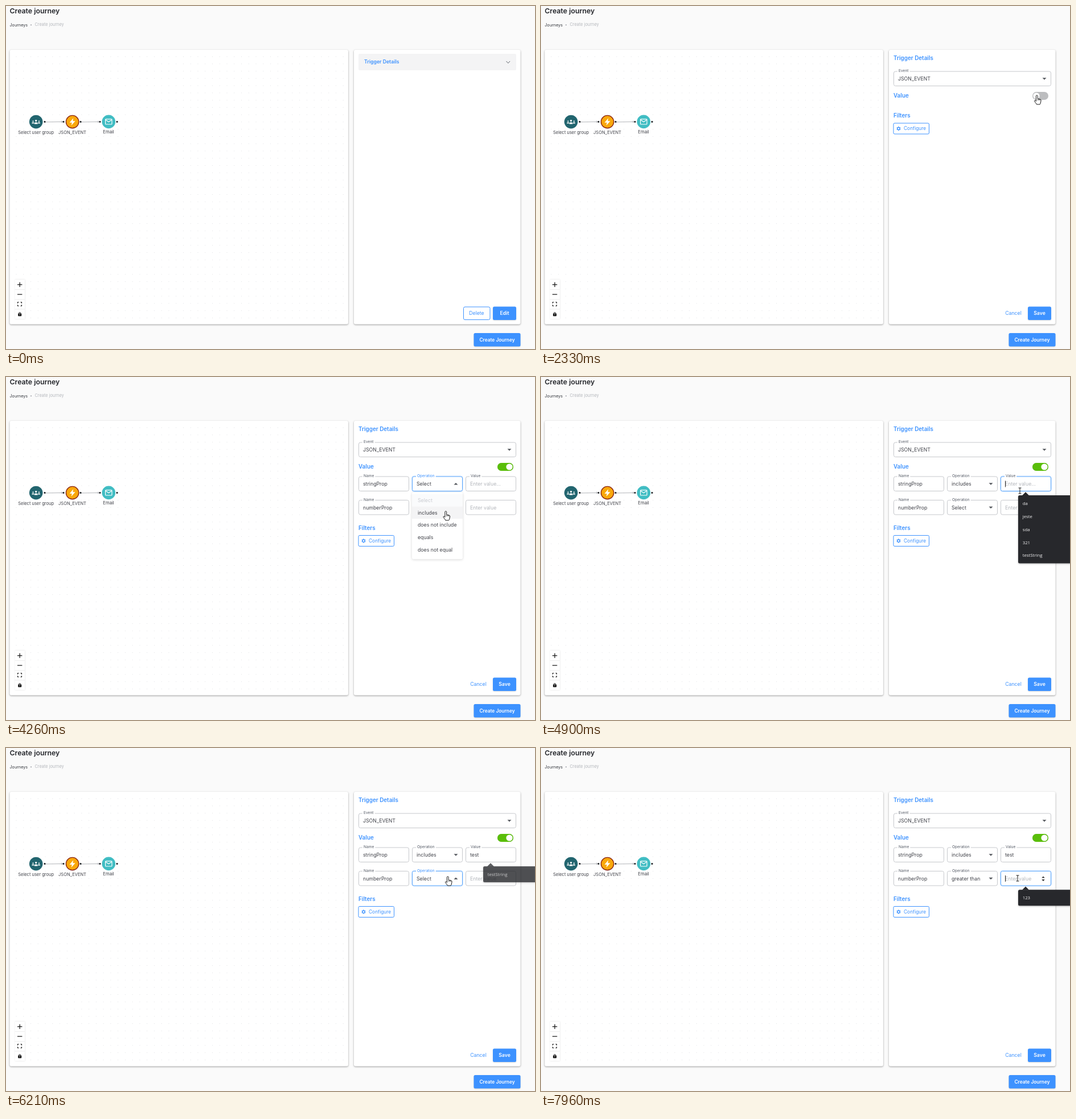
These frames come from a looping animation (929 by 603 pixels, 7.99 s). An HTML page with a canvas:

```html
<!DOCTYPE html>
<html lang="en">
<head>
<meta charset="utf-8">
<title>Create journey</title>
<style>
html, body { margin: 0; width: 100%; height: 100%; overflow: hidden; background: #fafafa; }
canvas { display: block; width: 929px; height: 603px; }
</style>
</head>
<body>
<canvas id="stage" width="929" height="603"></canvas>
<script>
const ctx = document.getElementById('stage').getContext('2d');
const LOOP = 7990;
const BLUE = '#3d92ff', INK = '#404249', BORDER = '#c6c8cc', HINT = '#b3b6bb', LABEL = '#555b66';

// Moments at which the interface changes, in ms
const T = {
  enter: 340, edit: 1150, toggle: 2680, open1: 3370, pick1: 4275, focus1: 4770, list1: 4850,
  type: [5080, 5290, 5480, 5680], open2: 6190, menu2: 6230, pick2: 7340, focus2: 7870
};

// Pointer tip: time, x, y, shape
const PATH = [
  [340, 852, 601, 'hand'], [560, 862, 580, 'hand'], [650, 868, 563, 'arrow'],
  [720, 873, 549, 'hand'], [810, 876, 541, 'hand'], [1320, 876, 541, 'hand'],
  [1380, 874, 520, 'arrow'], [1650, 851, 310, 'arrow'], [1930, 829, 168, 'arrow'],
  [1970, 830, 168, 'arrow'], [2200, 863, 160, 'hand'], [2330, 871, 157, 'hand'],
  [2720, 871, 157, 'hand'], [2830, 838, 171, 'arrow'], [3000, 790, 184, 'hand'],
  [3170, 771, 186, 'hand'], [3450, 771, 186, 'hand'], [3750, 773, 225, 'hand'],
  [4000, 772.5, 236, 'hand'], [4330, 772.5, 236, 'hand'], [4450, 790, 222, 'arrow'],
  [4560, 822, 196, 'beam'], [4700, 840, 192, 'beam'], [4850, 841, 197, 'beam'],
  [4900, 841, 200, 'beam'], [5930, 841, 200, 'beam'], [5990, 826, 208, 'arrow'],
  [6150, 776, 226, 'arrow'], [6260, 776, 226, 'hand'], [6400, 771, 248, 'hand'],
  [6710, 765, 288, 'hand'], [6830, 765, 289, 'hand'], [7000, 765, 289, 'hand'],
  [7090, 764, 284, 'hand'], [7380, 764, 284, 'hand'], [7450, 785, 262, 'arrow'],
  [7540, 815, 237, 'beam'], [7640, 837, 229, 'beam']
];

const HAND = new Path2D('M-1.6 1.2C-1.6-.6 1.2-.6 1.2 1.2V6L5.5 7Q7.2 7.4 7.1 9L6.4 13Q6 15 5 16H-.6Q-1.8 13.5-4.4 10.6Q-5 9-3.4 8.9L-1.6 10.4Z');
const ARROW = new Path2D('M0 0V10.6L2.6 8.4L4.2 12.2L6 11.4L4.4 7.6H7.6Z');

const clamp = v => Math.max(0, Math.min(1, v));
const ease = v => 1 - (1 - v) ** 3;
const ramp = (t, start, length) => clamp((t - start) / length);

function text(s, x, y, size, color, weight = 400, align = 'left', family = 'Inter') {
  ctx.font = `${weight} ${size}px "${family}", sans-serif`;
  ctx.fillStyle = color;
  ctx.textAlign = align;
  ctx.fillText(s, x, y + size * 0.36);
}

function box(x, y, w, h, r, fill, stroke, line = 1) {
  ctx.beginPath();
  ctx.roundRect(x, y, w, h, r);
  if (fill) { ctx.fillStyle = fill; ctx.fill(); }
  if (stroke) { ctx.strokeStyle = stroke; ctx.lineWidth = line; ctx.stroke(); }
}

function poly(points, fill, stroke, line = 1) {
  ctx.beginPath();
  points.forEach(([x, y]) => ctx.lineTo(x, y));
  if (fill) { ctx.fillStyle = fill; ctx.fill(); }
  if (stroke) { ctx.strokeStyle = stroke; ctx.lineWidth = line; ctx.stroke(); }
}

function disc(x, y, r, fill, stroke, line) {
  box(x - r, y - r, 2 * r, 2 * r, r, fill, stroke, line);
}

function shadowed(blur, dy, color, draw) {
  ctx.save();
  ctx.shadowBlur = blur;
  ctx.shadowOffsetY = dy;
  ctx.shadowColor = color;
  draw();
  ctx.restore();
}

function panel(x, w) {
  shadowed(3, 1, 'rgba(0,0,0,.38)', () => box(x, 77, w, 482.5, 3, '#fff'));
}

function button(x, y, w, label, size, hover) {
  shadowed(2, 1, 'rgba(0,0,0,.15)', () => box(x, y, w, 23.5, 2.5, hover ? '#327fe6' : BLUE));
  text(label, x + w / 2, y + 11.8, size, '#fff', 600, 'center');
}

function caret(x, y, up) {
  const d = up ? -1 : 1;
  poly([[x - 3.5, y - 1.7 * d], [x + 3.5, y - 1.7 * d], [x, y + 1.8 * d]], '#55585e');
}

function field(x, y, w, label, value, { hint, focus, bar, select, open, plainLabel } = {}) {
  if (focus) box(x + .5, y + .5, w - 1, 25.5, 3, null, 'rgba(61,146,255,.2)', 3);
  box(x + .5, y + .5, w - 1, 25.5, 3, '#fff', focus ? '#5aa6fb' : BORDER);
  if (label) {
    ctx.font = '400 6.6px Inter, sans-serif';
    ctx.fillStyle = '#fff';
    ctx.fillRect(x + 7, y - 3, ctx.measureText(label).width + 4, 6);
    text(label, x + 9, y - .8, 6.6, focus && !plainLabel ? BLUE : LABEL);
  }
  text(value, x + 8, y + 13.5, 8.75, hint ? HINT : INK);
  if (bar) { ctx.fillStyle = '#222'; ctx.fillRect(x + 8, y + 8, 1, 11); }
  if (select) caret(x + w - 12, y + 13.4, open);
}

function personIcon(x, y, s) {
  disc(x, y - 2.4 * s, 1.7 * s, '#fff');
  box(x - 2.9 * s, y + .4 * s, 5.8 * s, 3 * s, [2 * s, 2 * s, 0, 0], '#fff');
}

function edge(from, to) {
  poly([[from, 204], [to, 203.5]], null, '#b4b6ba');
  poly([[to - 4, 201.8], [to - 1.5, 203.5], [to - 4, 205.2]], null, '#b4b6ba');
}

function flow() {
  ctx.fillStyle = '#dfe0e3';
  for (let x = 18; x < 600; x += 12.76)
    for (let y = 89; y < 557; y += 12.76) ctx.fillRect(x - .5, y - .5, 1, 1);

  edge(68, 101);
  edge(131, 165);
  [68, 101, 131, 165, 195].forEach(x => disc(x, 203.6, 1.5, '#16181c'));

  disc(52.7, 203.6, 11.8, '#22656f');
  personIcon(47.5, 204.2, .68);
  personIcon(58, 204.2, .68);
  personIcon(52.7, 204, 1);

  disc(116.6, 203.6, 11.2, '#f9a80c', '#8e2a16', 1.4);
  poly([[118.2, 197.2], [111.6, 204.9], [115.7, 204.9], [114.7, 210], [121.6, 202.2], [117.3, 202.2]], '#fff');

  disc(180.3, 203.4, 11.8, '#41bdc3');
  box(174.6, 198.8, 11.4, 9.2, 1, null, '#fff', 1.2);
  poly([[174.8, 200], [180.3, 203.8], [185.8, 200]], null, '#fff', 1.2);

  text('Select user group', 52.6, 222, 7.5, INK, 400, 'center');
  text('JSON_EVENT', 116.5, 222, 7.5, INK, 400, 'center');
  text('Email', 180, 221.5, 7.7, INK, 400, 'center');
}

function controls() {
  shadowed(2, 0, 'rgba(0,0,0,.16)', () => box(15.5, 481, 17.5, 69, 0, '#fff'));
  ctx.fillStyle = '#eee';
  [498, 515.5, 532.5].forEach(y => ctx.fillRect(15.5, y, 17.5, 1));
  ctx.fillStyle = '#111';
  ctx.fillRect(20, 489.2, 8.4, 1.2);
  ctx.fillRect(23.6, 485.6, 1.2, 8.4);
  ctx.fillRect(20, 506.4, 8.4, 1.2);
  for (const sx of [-1, 1])
    for (const sy of [-1, 1])
      poly([[24 + sx * 1.5, 524 + sy * 3.3], [24 + sx * 3.5, 524 + sy * 3.3], [24 + sx * 3.5, 524 + sy * 1.3]], null, '#111', 1.1);
  box(21.2, 540.5, 6, 4.8, .8, '#111');
  ctx.beginPath();
  ctx.arc(24.2, 540.5, 1.8, Math.PI, 0);
  ctx.lineWidth = 1;
  ctx.stroke();
  disc(24.2, 542.8, .7, '#fff');
}

function configure(y) {
  text('Filters', 619, y, 9.9, BLUE, 600);
  box(619, y + 13.5, 62.5, 19, 2, '#fff', BLUE);
  const cx = 628, cy = y + 23;
  ctx.beginPath();
  for (let i = 0; i < 6; i++) {
    const a = i * Math.PI / 3 + Math.PI / 6;
    ctx.moveTo(cx + 2 * Math.cos(a), cy + 2 * Math.sin(a));
    ctx.lineTo(cx + 3.7 * Math.cos(a), cy + 3.7 * Math.sin(a));
  }
  ctx.lineWidth = 1.3;
  ctx.stroke();
  disc(cx, cy, 2.1, null, BLUE, 1.2);
  text('Configure', 637, y + 22.7, 8.4, BLUE, 400);
}

function toggle(k) {
  box(863, 151, 28, 14, 7, '#bcbdbf');
  ctx.globalAlpha = k;
  box(863, 151, 28, 14, 7, '#5abe0a');
  ctx.globalAlpha = 1;
  disc(870 + 14 * k, 158, 5.6, '#fff');
}

function menu(x, top, w, items, hoverColor, start, end, t, pointer) {
  const k = ease(ramp(t, start, 230)), fade = 1 - ramp(t, end, 180);
  if (k <= 0 || fade <= 0) return;
  const row = 21.65, h = items.length * row + 12, cx = x + w / 2;
  const s = .75 + .25 * k;
  ctx.save();
  ctx.globalAlpha = k * fade;
  ctx.translate(cx, top);
  ctx.scale(s, s * s);
  ctx.translate(-cx, -top);
  shadowed(4, 1, 'rgba(0,0,0,.16)', () => box(x, top + 2.5, w, h - 2.5, 3, '#fff'));
  const hover = Math.floor((pointer.y - top - 6) / row);
  items.forEach((item, i) => {
    const y = top + 6 + i * row;
    if (i === 0) { ctx.fillStyle = '#fafbfc'; ctx.fillRect(x, y, w, row); }
    else if (i === hover) { ctx.fillStyle = hoverColor; ctx.fillRect(x, y, w, row); }
    text(item, x + 10, y + row / 2, 8.75, i ? INK : '#c9cbd0');
  });
  ctx.restore();
}

function suggestions(top, items, alpha) {
  if (alpha <= 0) return;
  ctx.save();
  ctx.globalAlpha = alpha;
  shadowed(3, 1, 'rgba(0,0,0,.3)', () => {
    box(838, top, 100, items.length * 22.9 + 5, 2.5, '#27282c');
  });
  poly([[845, top + .2], [851, top - 5.8], [857, top + .2]], '#27282c');
  items.forEach((s, i) => text(s, 845.7, top + 14 + i * 22.9, 7.8, '#f1f1f2', 400, 'left', 'Open Sans'));
  ctx.restore();
}

function triggerRows(t) {
  const typed = 'test'.slice(0, T.type.filter(m => t >= m).length);
  const picked1 = t >= T.pick1, picked2 = t >= T.pick2;
  const inValue = t >= T.focus1 && t < T.open2;

  field(619, 174.5, 89, 'Name', 'stringProp');
  field(713, 174.5, 89, 'Operation', picked1 ? 'includes' : 'Select', {
    hint: false, select: true, focus: t >= T.open1 && t < T.focus1, open: t >= T.open1 && !picked1
  });
  field(807, 174.5, 89, 'Value', typed || 'Enter value...', {
    hint: !typed, focus: inValue, plainLabel: true, bar: inValue && !typed
  });

  field(619, 216, 89, 'Name', 'numberProp');
  field(713, 216, 89, 'Operation', picked2 ? 'greater than' : 'Select', {
    select: true, focus: t >= T.open2 && t < T.focus2, open: t >= T.open2 && !picked2
  });
  const inNumber = t >= T.focus2;
  field(807, 216, 89, '', 'Enter value', { hint: true, focus: inNumber, bar: inNumber });
  if (inNumber) {
    poly([[879.3, 228.6], [884.7, 228.6], [882, 225.4]], '#333');
    poly([[879.3, 231], [884.7, 231], [882, 234.2]], '#333');
  }
}

function details(t, pointer) {
  const on = t >= T.toggle;
  text('Trigger Details', 619, 91, 9.9, BLUE, 600);
  field(619, 114.5, 277, 'Event', 'JSON_EVENT', { select: true });
  text('Value', 619, 157.6, 9.9, BLUE, 600);
  toggle(ease(ramp(t, T.toggle, 150)));
  if (on) triggerRows(t);
  configure(on ? 265 : 192.5);

  text('Cancel', 829.5, 540, 8.7, BLUE, 400, 'center');
  button(855, 528.5, 41, 'Save', 8.7, pointer.y > 528 && pointer.shape === 'hand');

  menu(713, 200, 89, ['Select', 'includes', 'does not include', 'equals', 'does not equal'],
    '#f4f4f5', T.open1, T.pick1, t, pointer);
  menu(702, 241.2, 111.5, ['Select', 'greater than', 'greater than or equals', 'equals',
    'does not equal', 'less than', 'less than or equals'], '#dedede', T.menu2, T.pick2, t, pointer);

  const list = t < T.type[0] ? ['da', 'jeste', 'sda', '321', 'testString'] : ['testString'];
  suggestions(208, list, ramp(t, T.list1 - 40, 80) * (1 - ramp(t, T.open2 - 10, 120)));
  suggestions(249.3, ['123'], ramp(t, T.focus2 + 10, 80));
}

function summary(hover) {
  box(619, 84, 277, 29, 2, '#f4f4f5');
  text('Trigger Details', 629, 98.2, 8.7, BLUE, 600);
  poly([[878.5, 97], [881.8, 100.5], [885.1, 97]], null, '#5c6068', 1);
  box(803.5, 529, 46.5, 22.5, 2.5, '#fff', BLUE);
  text('Delete', 826.5, 540, 8.7, BLUE, 400, 'center');
  button(855, 528.5, 41, 'Edit', 8.8, hover);
}

function pointerAt(t) {
  let i = 0;
  while (i < PATH.length - 1 && t >= PATH[i + 1][0]) i++;
  const a = PATH[i], b = PATH[i + 1] || a;
  const k = b === a ? 0 : clamp((t - a[0]) / (b[0] - a[0]));
  return {
    x: a[1] + (b[1] - a[1]) * k, y: a[2] + (b[2] - a[2]) * k,
    shape: k > .5 ? b[3] : a[3], visible: t >= T.enter
  };
}

function drawPointer({ x, y, shape, visible }) {
  if (!visible) return;
  ctx.save();
  ctx.translate(x, y);
  ctx.lineJoin = 'round';
  if (shape === 'beam') {
    ctx.fillStyle = '#1a1a1a';
    ctx.fillRect(-.5, -5, 1, 10);
    ctx.fillRect(-2.5, -5.5, 5, 1);
    ctx.fillRect(-2.5, 4.5, 5, 1);
  } else {
    const path = shape === 'hand' ? HAND : ARROW;
    ctx.fillStyle = '#fff';
    ctx.strokeStyle = '#1a1a1a';
    ctx.lineWidth = 1;
    ctx.fill(path);
    ctx.stroke(path);
    if (shape === 'hand') {
      ctx.beginPath();
      for (const dx of [1.2, 3.2, 5]) { ctx.moveTo(dx, 6.5); ctx.lineTo(dx, 9); }
      ctx.lineWidth = .7;
      ctx.stroke();
    }
  }
  ctx.restore();
}

function render(t) {
  const pointer = pointerAt(t);
  const over = (x, y, w, h) => pointer.visible && pointer.x >= x && pointer.x <= x + w
    && pointer.y >= y && pointer.y <= y + h;

  ctx.fillStyle = '#fafafa';
  ctx.fillRect(0, 0, 929, 603);
  text('Create journey', 6.5, 9, 12.3, '#24262b', 600);
  text('Journeys', 6.5, 33, 7.2, '#33363c');
  disc(44, 33.3, 1.1, '#a5a8ad');
  text('Create journey', 50.5, 32.5, 7.35, '#b4b7bc');

  panel(6.5, 594.5);
  panel(611, 292.5);
  flow();
  controls();
  button(821.5, 575, 82, 'Create Journey', 8.35, over(821, 575, 82, 24));
  if (t < T.edit) summary(over(855, 528, 41, 24));
  else details(t, pointer);
  drawPointer(pointer);
}

const start = performance.now();
function tick() {
  render((performance.now() - start) % LOOP);
  requestAnimationFrame(tick);
}
render(0);
requestAnimationFrame(tick);
</script>
</body>
</html>
```
